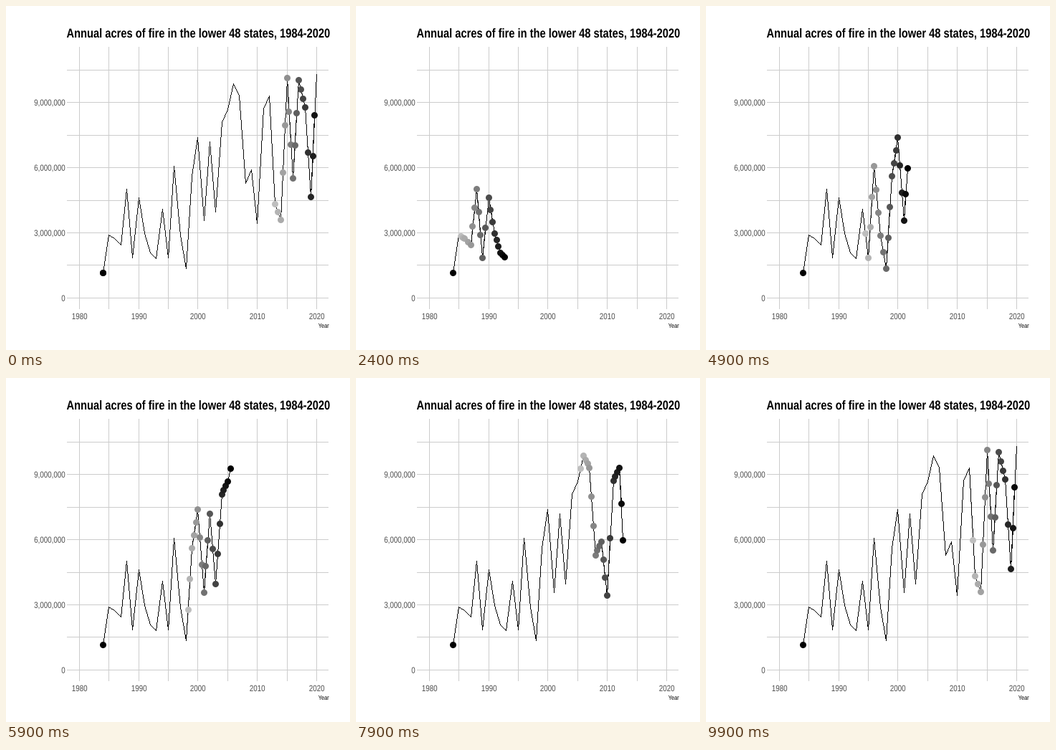
These frames come from a looping animation (480 by 480 pixels, 10000 ms). A matplotlib script:

```python
import matplotlib.pyplot as plt
import numpy as np
from matplotlib.animation import FuncAnimation
from matplotlib.patches import PathPatch
from matplotlib.textpath import TextPath
from matplotlib.transforms import Affine2D

plt.rcParams["path.simplify"] = False

SIZE, DPI, FRAMES, WAKE = 480, 100, 100, 20
PX = 72 / DPI      # one pixel in points
NARROW = 0.815     # proportion of the condensed face
FADE = 190 / 255   # grey at the end of the wake

YEARS = np.arange(1984, 2021)
ACRES = np.array([
    1.148, 2.896, 2.719, 2.447, 5.009, 1.827, 4.622, 2.954, 2.070, 1.798,
    4.074, 1.841, 6.066, 2.857, 1.330, 5.626, 7.393, 3.571, 7.185, 3.961,
    8.098, 8.689, 9.874, 9.328, 5.292, 5.922, 3.423, 8.711, 9.326, 4.320,
    3.596, 10.125, 5.510, 10.026, 8.767, 4.664, 10.300])  # millions

# Every year lands on a whole frame; positions between are interpolated.
KEYS = np.round((YEARS - YEARS[0]) * (FRAMES - 1) / (YEARS[-1] - YEARS[0]))


def px(year):
    return np.round(101.68 + 8.285 * (np.asarray(year) - 1980)) + 0.5


def py(millions):
    return np.round(406.7 - 30.25 * np.asarray(millions)) + 0.5


def head(i):
    return np.interp(i, KEYS, YEARS), np.interp(i, KEYS, ACRES)


def trail(i, whole):
    """Corners of the line up to step i, or only of its last piece."""
    done = np.flatnonzero(KEYS < i)
    if not whole:
        done = done[-1:]
    year, acres = head(i)
    return px(np.append(YEARS[done], year)), py(np.append(ACRES[done], acres))


def aliased(xs, ys):
    """One-pixel dashes along a polyline, for a line without smoothing."""
    cols, rows = [], []
    for x0, y0, x1, y1 in zip(xs, ys, xs[1:], ys[1:]):
        n = int(max(abs(x1 - x0), abs(y1 - y0))) + 1
        cols.append(np.floor(np.linspace(x0, x1, n)))
        rows.append(np.floor(np.linspace(y0, y1, n)) + 0.5)
    if not cols:
        return [], []
    x, y = np.concatenate(cols), np.concatenate(rows)
    gap = np.full_like(x, np.nan)
    return np.c_[x, x + 1, gap].ravel(), np.c_[y, y, gap].ravel()


def label(s, x, y, size, color="black", align=0.0, weight="normal"):
    path = TextPath((0, 0), s, size=size,
                    prop={"family": "Liberation Sans", "weight": weight})
    box = path.get_extents()
    shift = x - align * box.x1 * NARROW
    place = Affine2D().scale(NARROW, -1).translate(shift, y)
    ax.add_patch(PathPatch(place.transform_path(path), fc=color, lw=0, zorder=5))


fig = plt.figure(figsize=(SIZE / DPI, SIZE / DPI), dpi=DPI, facecolor="white")
ax = fig.add_axes([0, 0, 1, 1])
ax.set_xlim(0, SIZE)
ax.set_ylim(SIZE, 0)
ax.axis("off")

stroke = dict(lw=PX, snap=False, solid_capstyle="butt")
grid = dict(color="#cccccc", zorder=1, **stroke)
for year in range(1980, 2021, 5):
    ax.plot([px(year)] * 2, [57, 423], **grid)
    if year % 10 == 0:
        label(str(year), px(year), 437, 12, "#4d4d4d", 0.5)
for step in range(8):
    value = 1.5 * step
    ax.plot([85, 450], [py(value)] * 2, **grid)
    if step % 2 == 0:
        label(f"{int(value * 1e6):,}", 82.3, py(value) + 4.3, 12, "#4d4d4d", 1)

label("Annual acres of fire in the lower 48 states, 1984-2020",
      84.5, 44, 18, weight="bold")
label("Year", 450.5, 449, 9, align=1)

# Oldest first, so the newest line ends up on top.
ages = np.arange(WAKE, -1, -1)
shades = [str(FADE * age / WAKE) for age in ages]
lines = [ax.plot([], [], color=c, zorder=2, **stroke)[0] for c in shades]
dots = ax.scatter([], [], s=(9 * PX) ** 2, linewidths=0, snap=False, zorder=3)


def draw(i):
    spots, colors = [], []
    for age, shade, line in zip(ages, shades, lines):
        j = (i - age) % FRAMES
        # Older lines only show where their last piece strays from the newest.
        whole = age == 0 or j == FRAMES - 1
        line.set_data(*aliased(*trail(j, whole)))
        if j < FRAMES - 1:  # the final year has no dot
            year, acres = head(j)
            spots.append((px(year), py(acres)))
            colors.append(shade)
    # The first year stays marked throughout.
    spots.append((px(YEARS[0]), py(ACRES[0])))
    colors.append("0")
    dots.set_offsets(spots)
    dots.set_facecolor(colors)
    return [*lines, dots]


anim = FuncAnimation(fig, draw, frames=FRAMES, interval=100,
                     repeat=True, repeat_delay=0, blit=False)
plt.show()
```
